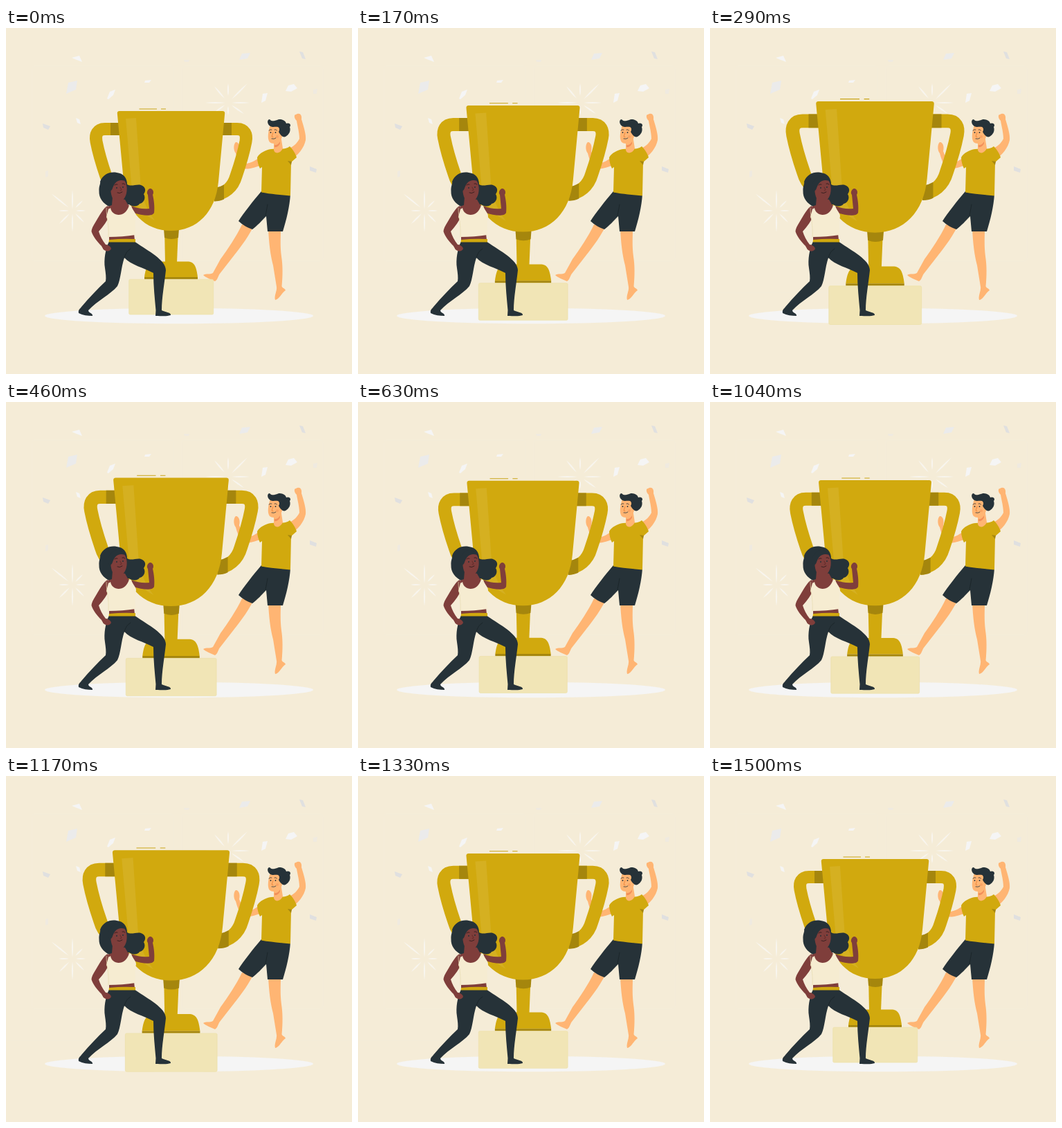
Animation of 500 by 500 pixels, one loop 1540 ms. Source, as an HTML page:

```html
<!DOCTYPE html>
<html lang="en">
<head>
<meta charset="utf-8">
<title>Trophy celebration</title>
<style>
  html, body { margin: 0; width: 100%; height: 100%; overflow: hidden; background: #f5ecd7; }
  svg { display: block; width: 100vw; height: 100vh; }
  .dark { fill: #263238; }
  .gold { fill: #d1a90e; }
  .shade { fill: #a5860d; }
  .tan { fill: #ffb573; }
  .brown { fill: #7f3e3b; }
  .line { fill: none; stroke-linecap: round; stroke-linejoin: round; }
</style>
</head>
<body>
<svg viewBox="0 0 500 500">
  <rect width="500" height="500" fill="#f5ecd7"/>
  <g fill="none" stroke="#f4ecda" stroke-width=".8">
    <rect x="37.500" y="55" width="205" height="282" rx="4"/>
    <rect x="254" y="55" width="204" height="282" rx="4"/>
    <path d="M0 382.500 H500"/>
  </g>
  <ellipse cx="250" cy="416" rx="194" ry="11.3" fill="#f5f5f5"/>
  <g id="confetti"></g>
  <g id="rays" fill="#f8f5ee"></g>

  <g id="man">
    <path class="tan" d="M369 185 C362 191 354 195 347 196 C342 190 339 184 337 178 C339 171 336 164 332 165 C329 167 328 176 332 181 C334 189 337 197 342 203 C351 205 362 201 371 197Z"/>
    <path class="tan" d="M409 174 C416 171 421 166 424 160 C424 151 421 141 420 134 C416 130 416 125 419 125 C424 122 428 125 427 132 C430 142 434 154 433 162 C431 173 422 184 412 190Z"/>
    <path class="tan" d="M341 284 C333 301 321 319 310 334 L299 354 C295 357 289 354 285 357 C289 361 296 363 302 366 C306 364 306 359 309 355 L330 328 C342 313 351 300 358 286Z"/>
    <path class="tan" d="M379 290 C380 311 382 328 386 343 L391 374 C392 380 387 387 389 393 C395 392 398 383 404 379 C403 376 399 376 398.500 373 C400 358 400 343 398 330 C396 314 397 304 397 290Z"/>
    <path class="dark" d="M369 236 C357 250 343 268 336 279 C341 284 350 289 356 291 C363 286 370 278 376 272 L378 294 L400 294 C405 278 410 258 411 240Z"/>
    <path d="M375 271 L378 255" class="line" stroke="#182125" stroke-width=".7"/>
    <path class="gold" d="M383 175 C375 176 366 181 363 187 C363 193 365 199 367 203 L370 201 L369 237.500 C382 240 398 241 411 242.500 L412 194 L420 187 C418 180 413 174 410 171 C407 174 400 175 398 174Z"/>
    <path class="shade" d="M407 192 L413 193 L412 198Z"/>
    <path class="tan" d="M387 163 L387 174 C386 181 395 184 400 174 L397 155Z"/>
    <path d="M388 169 Q393 170 396 164 L396 167 Q393 173 388 172Z" fill="#f28f5a"/>
    <path class="tan" d="M382 140 C379 149 377 160 381 165 C386 169 396 167 399 157 L396 140Z"/>
    <path class="dark" d="M382 142 C377 139 377 132 381 132 C384 136 388 134 393 132.500 C398 131 404 134 405 138 C409 136 413 140 410 143 C412 149 409 154 404 157 C400 159 396 154 394 150 C396 147 395 144 393 143 C389 142 386 144 382 142Z"/>
    <circle class="dark" cx="382.500" cy="151" r=".9"/>
    <circle class="dark" cx="389.500" cy="151" r=".9"/>
    <path d="M380 148 Q382 146 384 147 M388 147 Q390 146 391.500 148 M384 160 Q388 161 390 159" class="line" stroke="#263238" stroke-width=".8"/>
    <path d="M386 151 L384 157 L386 157.500" class="line" stroke="#ed893e" stroke-width="1"/>
    <circle cx="392" cy="157" r="2" fill="#f9a365"/>
  </g>

  <g id="trophy">
    <g id="handle">
      <path d="M312 146 H334 C345 146 348.500 154 346.500 164 C343 182 338 198 332.500 214 C328 230 316 240 300 241.500" fill="none" stroke="#d1a90e" stroke-width="18"/>
      <path class="shade" d="M312 137 H326 V155 H312Z M302 231 Q309 230 315 226.500 L315 247.500 Q309 250.500 301 250.500Z"/>
    </g>
    <use href="#handle" transform="matrix(-1 0 0 1 477 0)"/>
    <path class="gold" d="M229 290 H249 L247 339 H230Z"/>
    <path class="shade" d="M228 290 H250 L249 303 Q239 307 229 303Z"/>
    <path class="gold" d="M164 120 H313 Q316.500 120 316.200 123.500 L307 222 C303 266 276 293 238.500 293 C201 293 174 266 170 222 L160.800 123.500 Q160.500 120 164 120Z"/>
    <path d="M173 131 L188 130 L194.500 225 Q197 255 215 278 Q187 264 182 235Z" fill="#fff" opacity=".08"/>
    <path d="M192.500 117 H218 M224 117 H231" fill="none" stroke="#c9a519" stroke-width="1"/>
    <path class="gold" d="M217 337.500 H262 C272 337.500 275 344 277 360 H200 C202 344 206 337.500 217 337.500Z"/>
    <path class="shade" d="M200 360 H277 V363 H200Z"/>
    <rect x="177.700" y="363.200" width="122" height="50.800" rx="1.800" fill="#f1e5b6" stroke="#ecdfa6" stroke-width=".6"/>
  </g>

  <g id="woman">
    <path class="dark" d="M151 259 C140 254 134 245 134.500 236 C134 228 137 225 136 222 C140 211 151 207 160 209 C170 210 175 217 175 226 C181 230 189 225 195 227 C203 230 202 236 199 240 C203 247 198 253 193 254 C191 258 184 259 178 255Z"/>
    <path class="brown" d="M181 257 C190 261 199 262 207 261 L205 241 C202 237 206 231 209 232 C213 233 214 238 212 241 C214 249 215 260 214 267 C211 273 197 271 184 267Z"/>
    <path class="brown" d="M147 257 C141 260 137 268 132 276 C128 283 124 288 123.500 294 C126 302 132 309 138 315 C140 320 145 323 150 322 C153 319 151 314 144 313 C139 307 136 300 134 294 C141 286 146 279 149 272Z"/>
    <path class="brown" d="M154 244 L153 256 L147 258 L149 272 H183 L181 258 L176 255 L172 248Z"/>
    <path class="brown" d="M149 302 L150 297 H185 L186 307 H149Z"/>
    <path d="M148 262 L151 260 C153 273 173 275 178 256 L181 257 C183 264 188 267 188 272 C186 281 187 291 187 299 C175 301 161 302 148 302 C149 291 149 281 145 273Z" fill="#f6ecd1"/>
    <path d="M145 260 C145 273 149 283 148 302" class="line" stroke="#e7dcae" stroke-width=".7"/>
    <path class="brown" d="M154 221 C150 230 151 240 154 246 C159 256 171 252 174 239 C176 229 173 222 170 219 C163 217 157 217 154 221Z"/>
    <path class="dark" d="M172 221 C164 218 158 221 154.500 230 C153 236 150 237 148 233 C146 222 154 213 163 214 Q171 216 172 221Z"/>
    <circle class="dark" cx="160" cy="231" r="1"/>
    <circle class="dark" cx="169" cy="230" r="1"/>
    <path d="M157 227 Q159 225 161 226 M168 225 Q170 224 172 226 M161 238 Q164 240 168 237" class="line" stroke="#29191a" stroke-width=".8"/>
    <path d="M165 230 L167 234 L165 235" class="line" stroke="#632a28" stroke-width="1"/>
    <path class="gold" d="M149 306 Q168 304 187 305 L187 310 H148.500Z"/>
    <path class="dark" d="M148.500 309.500 C144 319 141 335 143 347 C144 354 145 361 144 366 C132 377 121 389 109 403 C107 406 104 407 105 412 C111 415 118 416 125 416 C126 412 119 412 119 408 C132 394 151 385 161 373 C166 363 166 347 171 332 C180 342 200 347 213 354 C213 373 215 391 216.500 408 L216 416 C225 416 232 417 238 415 C239 411 231 411 225 408 C225 390 229 369 231 350 C231 335 205 322 187 309.500Z"/>
    <path class="line" d="M171 332 Q173 323 180 319" stroke="#182125" stroke-width=".7"/>
    <path class="brown" d="M140 315 C144 312 151 314 152 319 C150 324 143 323 140 319Z"/>
  </g>
</svg>
<script>
const add = (id, tag, attrs) => {
  const el = document.createElementNS("http://www.w3.org/2000/svg", tag);
  for (const k in attrs) el.setAttribute(k, attrs[k]);
  document.getElementById(id).append(el);
};

const flakes = {
  "#f5f5f5": "M95 43L106 40L110 49L102 46Z M201 76L210 75L207 79L200 79Z M146 102L150 92L158 89L155 97L148 103Z M101 130L106 132L108 139L103 137Z M408 83L416 81L421 87L412 92L404 91Z M371 95L378 94L375 105L369 108Z",
  "#ebebeb": "M90 79L103 76L101 89L87 95Z M341 37L353 36L349 44L337 46Z",
  "#efeae0": "M57 207L61 206L61 214L57 216Z M444 89L450 88L449 95L444 95Z M257 46L265 46L264 49L258 49Z",
  "#e0e0e0": "M53 138L64 142L61 147L54 144Z M424 34L429 35L433 45L428 44Z M439 200L449 204L448 209L439 206Z"
};
for (const fill in flakes) add("confetti", "path", { d: flakes[fill], fill });

// Each ray: angle in degrees, inner radius, outer radius
const burst = (x, y, rays) => rays.forEach(([angle, from, to]) => {
  const mid = (from + to) / 2;
  add("rays", "path", {
    d: `M${from} 0Q${mid} -2.200 ${to} 0Q${mid} 2.200 ${from} 0Z`,
    transform: `translate(${x} ${y}) rotate(${angle})`
  });
});
burst(321, 108, [[0, 5, 31], [35, 6, 28], [90, 5, 18], [145, 6, 23],
  [180, 4, 33], [230, 8, 31], [270, 10, 28], [-45, 7, 39]]);
burst(96, 264, [[0, 5, 19], [45, 6, 24], [90, 4, 31], [135, 6, 27],
  [180, 5, 20], [219, 7, 39], [270, 2, 30], [-45, 6, 21]]);

// Trophy pulse: time in ms, scale
const LOOP = 1540, STEP = 1000 / 24;
const pulse = [[0, 1], [300, 1.1], [870, 1], [900, 1], [1160, 1.088], [1209, 1.09], [1333, 1.056], [1500, 1]];
const trophy = document.getElementById("trophy");

function scaleAt(t) {
  const i = Math.max(1, pulse.findIndex(p => p[0] >= t));
  const [t0, a] = pulse[i - 1], [t1, b] = pulse[i];
  return a + (b - a) * (t - t0) / (t1 - t0);
}

function draw() {
  const step = Math.floor((performance.now() % LOOP + 5) / STEP);
  const s = scaleAt(Math.min(step, 36) * STEP);
  trophy.setAttribute("transform", `translate(238.5 264.75) scale(${s}) translate(-238.5 -264.75)`);
  requestAnimationFrame(draw);
}
draw();
</script>
</body>
</html>
```
